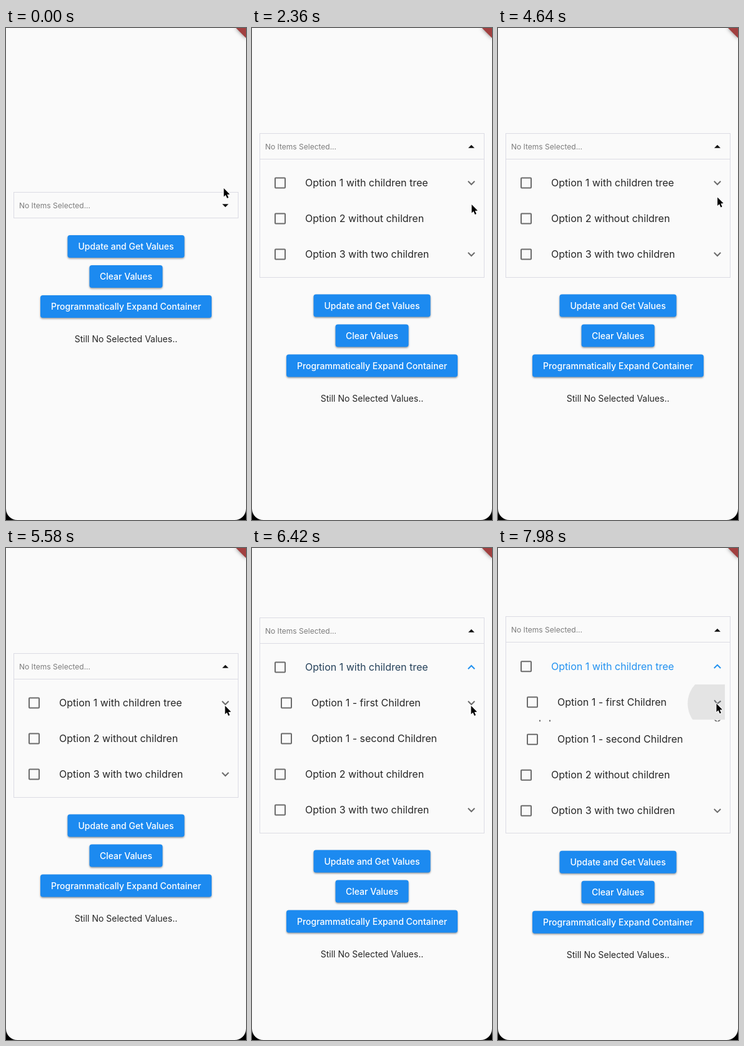
An HTML page with a canvas for the animation above (8000 ms loop, 384 by 786 pixels).

```html
<!DOCTYPE html>
<html lang="en">
<head>
<meta charset="utf-8">
<title>Tree dropdown</title>
<style>
  html, body { margin: 0; width: 100%; height: 100%; overflow: hidden; background: #fafafa; }
  canvas { display: block; width: 384px; height: 786px; }
</style>
</head>
<body>
<canvas id="stage"></canvas>
<script>
const W = 384, H = 786, LOOP = 8000, ROW = 57, STEP = 24;
const BG = '#fafafa', BORDER = '#dcdce4', DARK = [38, 38, 38], GREY = [108, 108, 108], BLUE = [33, 145, 240];

const OPEN_PANEL = 870, OPEN_FIRST = 3037, OPEN_NESTED = 4074;
const POINTER = [[0, 348, 256], [6, 348, 258], [17, 351, 279], [24, 353, 281], [33, 351, 282],
  [90, 351, 282], [106, 350.5, 265], [117, 350, 252], [145, 350, 252], [160, 349, 248.5]];

const canvas = document.getElementById('stage');
const ctx = canvas.getContext('2d');
const ratio = window.devicePixelRatio || 1;
canvas.width = W * ratio;
canvas.height = H * ratio;

const clamp = v => Math.max(0, Math.min(1, v));
const easeIn = v => clamp(v) ** 1.7;
const rgb = c => `rgb(${c.join(',')})`;
const mix = (a, b, p) => rgb(a.map((v, i) => Math.round(v + (b[i] - v) * p)));

// Steps are held for 20, 100 and 20 ms in turn.
function stepAt(ms) {
  const part = ms % 140;
  return 3 * Math.floor(ms / 140) + (part < 20 ? 0 : part < 120 ? 1 : 2);
}

function pointerAt(step) {
  const next = POINTER.findIndex(k => k[0] > step);
  if (next < 0) return POINTER[POINTER.length - 1].slice(1);
  const a = POINTER[next - 1], b = POINTER[next];
  const p = (step - a[0]) / (b[0] - a[0]), s = p * p * (3 - 2 * p);
  return [a[1] + (b[1] - a[1]) * s, a[2] + (b[2] - a[2]) * s];
}

function text(str, x, baseline, size, color, align = 'left', weight = 400) {
  ctx.font = `${weight} ${size}px Inter, sans-serif`;
  ctx.textAlign = align;
  ctx.fillStyle = color;
  ctx.fillText(str, x, baseline);
}

function polygon(points, color) {
  ctx.beginPath();
  points.forEach(([x, y]) => ctx.lineTo(x, y));
  ctx.closePath();
  ctx.fillStyle = color;
  ctx.fill();
}

function clipped(x, y, w, h, draw) {
  ctx.save();
  ctx.beginPath();
  ctx.rect(x, y, w, h);
  ctx.clip();
  draw();
  ctx.restore();
}

function button(label, y, w) {
  ctx.save();
  ctx.shadowColor = 'rgba(0,0,0,.4)';
  ctx.shadowBlur = 3 * ratio;
  ctx.shadowOffsetY = 1.5 * ratio;
  ctx.fillStyle = '#1c8af0';
  ctx.beginPath();
  ctx.roundRect(192 - w / 2, y, w, 36, 4);
  ctx.fill();
  ctx.restore();
  text(label, 192, y + 23, 14, '#fff', 'center', 500);
}

function checkbox(x, cy) {
  ctx.strokeStyle = rgb(GREY);
  ctx.lineWidth = 2;
  ctx.beginPath();
  ctx.roundRect(x + 1, cy - 8, 16, 16, 1);
  ctx.stroke();
}

function chevron(cy, p) {
  ctx.save();
  ctx.translate(351, cy);
  ctx.rotate(Math.PI * p);
  ctx.strokeStyle = mix(GREY, BLUE, p);
  ctx.lineWidth = 2;
  ctx.beginPath();
  ctx.moveTo(-5.2, -2.7);
  ctx.lineTo(0, 2.5);
  ctx.lineTo(5.2, -2.7);
  ctx.stroke();
  ctx.restore();
}

function ripple(top, age, pointer) {
  if (age <= 0 || age >= 200) return;
  clipped(21, top, 342, ROW - 0.5, () => {
    ctx.fillStyle = `rgba(120,120,120,${0.2 * (1 - age / 200)})`;
    ctx.beginPath();
    ctx.arc(...pointer, 17 + age * 0.95, 0, 7);
    ctx.fill();
  });
}

// A null age marks a leaf; otherwise it is the time since the row was tapped.
function row(label, top, indent, age, pointer) {
  const cy = top + ROW / 2, tapped = age === null ? -1 : age;
  ripple(top, tapped, pointer);
  checkbox(36 + indent, cy);
  const tint = Math.max(0.06 * easeIn(tapped / 200), clamp((tapped - 200) / 200));
  text(label, 85 + indent, cy + 5.8, 16, mix(DARK, BLUE, tint));
  if (age !== null) chevron(cy, easeIn(age / 200));
}

function options(top, now, firstHeight, nestedHeight, pointer) {
  row('Option 1 with children tree', top, 0, now - OPEN_FIRST, pointer);
  const inner = top + ROW, full = 2 * ROW + nestedHeight;
  // Children are revealed outward from their vertical centre.
  if (firstHeight > 0) clipped(13, inner, 358, firstHeight, () => {
    const y = inner + (firstHeight - full) / 2;
    row('Option 1 - first Children', y, 10, now - OPEN_NESTED, pointer);
    row('Option 1 - second Children', y + ROW + nestedHeight, 10, null);
    clipped(13, y + ROW, 358, nestedHeight, () => {
      const cy = y + ROW + nestedHeight / 2;
      checkbox(66, cy);
      chevron(cy, 0);
    });
  });
  row('Option 2 without children', inner + firstHeight, 0, null);
  row('Option 3 with two children', inner + firstHeight + ROW, 0, -1);
}

function frameDecor() {
  ctx.save();
  ctx.shadowColor = 'rgba(0,0,0,.5)';
  ctx.shadowBlur = 6 * ratio;
  polygon([[367, -1], [385, -1], [385, 17]], '#a14040');
  ctx.restore();
  ctx.fillStyle = '#000';
  for (const [x, cx] of [[0, 18], [W, W - 18]]) {
    ctx.beginPath();
    ctx.moveTo(x, H);
    ctx.lineTo(x, H - 18);
    ctx.arc(cx, H - 18, 18, x ? 0 : Math.PI, Math.PI / 2, !x);
    ctx.fill();
  }
}

function drawPointer([x, y]) {
  ctx.save();
  ctx.translate(x, y);
  ctx.lineJoin = 'round';
  ctx.lineWidth = 2;
  ctx.strokeStyle = '#fff';
  const shape = [[0.5, 0], [0.5, 13.5], [3.5, 10.8], [5.8, 16], [8, 15], [5.8, 10], [10, 9.7]];
  ctx.beginPath();
  shape.forEach(p => ctx.lineTo(...p));
  ctx.closePath();
  ctx.stroke();
  polygon(shape, '#000');
  ctx.restore();
}

function draw(ms) {
  const step = stepAt(ms), now = step * STEP, pointer = pointerAt(step);
  const nested = ROW * easeIn((now - OPEN_NESTED) / 200);
  const first = easeIn((now - OPEN_FIRST) / 200) * (2 * ROW + nested);
  const body = easeIn((now - OPEN_PANEL) / 200) * (3 * ROW + 18 + first);
  const top = 263 - body / 2, below = body / 2, open = now > OPEN_PANEL;

  ctx.setTransform(ratio, 0, 0, ratio, 0, 0);
  ctx.fillStyle = BG;
  ctx.fillRect(0, 0, W, H);

  if (body > 0) clipped(13, top + 41, 358, body, () =>
    options(top + 50.5, now, first, nested, pointer));

  ctx.strokeStyle = BORDER;
  ctx.lineWidth = 1;
  const edge = Math.round(top) - 0.5;
  ctx.strokeRect(12.5, edge, 359, Math.round(41 + body));
  if (open) {
    ctx.beginPath();
    ctx.moveTo(13, edge + 41);
    ctx.lineTo(371, edge + 41);
    ctx.stroke();
  }
  text('No Items Selected...', 21, top + 25, 12, '#7c7c7c');
  const dir = open ? -1 : 1, mid = top + 20.8;
  polygon([[346, mid - 2.5 * dir], [356, mid - 2.5 * dir], [351, mid + 2.5 * dir]], '#111');

  button('Update and Get Values', 331 + below, 187);
  button('Clear Values', 379 + below, 117);
  button('Programmatically Expand Container', 427 + below, 274);
  text('Still No Selected Values..', 192, 502 + below, 14, '#262626', 'center');

  frameDecor();
  drawPointer(pointer);
}

const start = performance.now();
function tick() {
  draw((performance.now() - start) % LOOP);
  requestAnimationFrame(tick);
}
tick();
</script>
</body>
</html>
```
